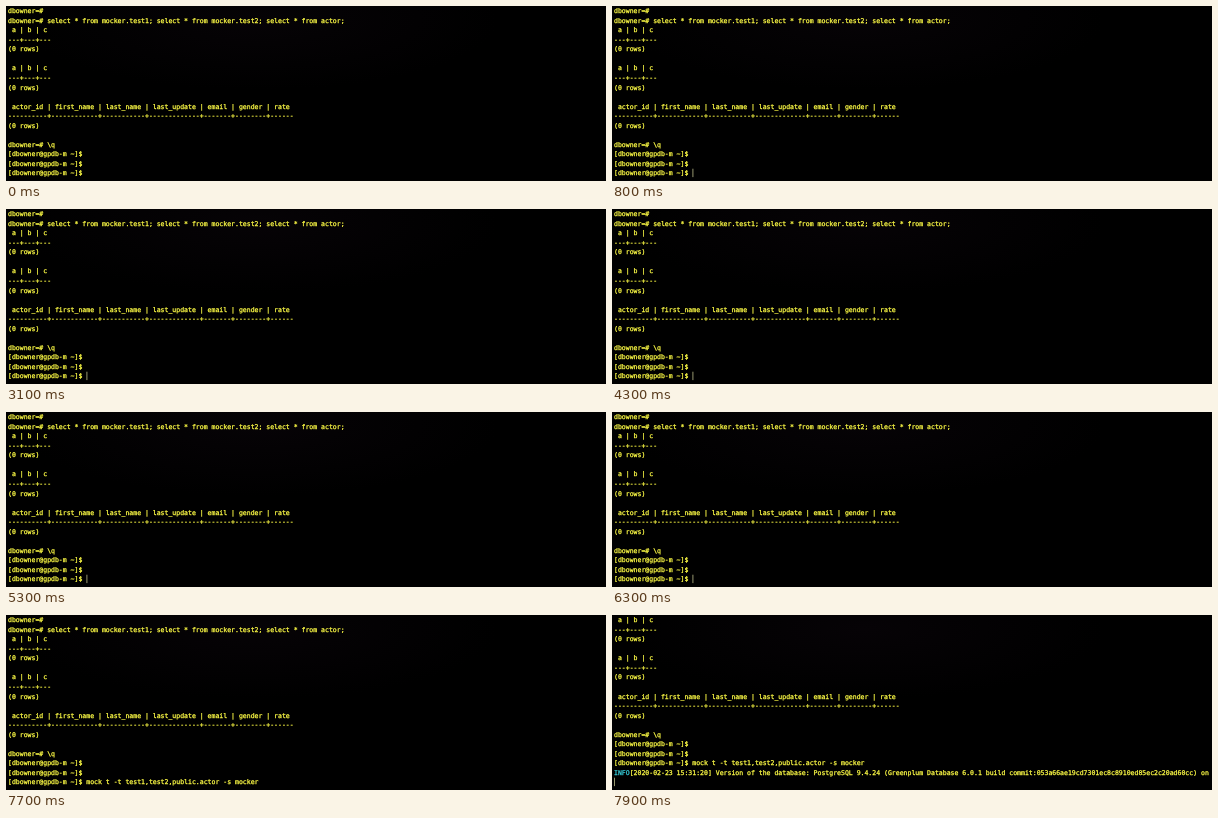
An HTML page for the animation above (8000 ms loop, 600 px wide and 175 px high).

```html
<!DOCTYPE html>
<html lang="en">
<head>
<meta charset="utf-8">
<title>Terminal session</title>
<style>
  html, body { margin: 0; width: 100%; height: 100%; overflow: hidden; background: #000; }
  svg { display: block; width: 100%; height: 100%; }
  text {
    font: 6.51px "DejaVu Sans Mono", monospace;
    fill: #fdfb45;
    stroke: #fdfb45;
    stroke-width: .28;
    white-space: pre;
    text-rendering: geometricPrecision;
  }
  .info { fill: #35cbd8; stroke: #35cbd8; }
</style>
</head>
<body>
<svg viewBox="0 0 600 175" xmlns="http://www.w3.org/2000/svg">
  <defs>
    <radialGradient id="glow" cx=".42" cy=".08" r=".4">
      <stop offset="0" stop-color="#060306"/>
      <stop offset="1" stop-color="#000"/>
    </radialGradient>
  </defs>
  <rect width="600" height="175" fill="url(#glow)"/>
  <g id="screen"></g>
  <rect id="caret" width="1" height="8.4" fill="#96966e"/>
  <path id="pointer" d="M-2 -4Q0 -4 0 -2.8Q0 -4 2 -4M0 -3V3M-2 4Q0 4 0 2.8Q0 4 2 4"
        fill="none" stroke="#c4c4c4" stroke-width=".9"/>
</svg>
<script>
const LOOP = 8000, LEFT = 2, CHAR = 3.92, TOP = 7.3, LINE = 9.53;
const PASTE = 6500, RUN = 7900;
const LAST_ROW = 17;

const $ = id => document.getElementById(id);
const screen = $('screen'), caret = $('caret'), pointer = $('pointer');

const rule = widths => widths.map(n => '-'.repeat(n)).join('+');
const small = [' a | b | c', rule([3, 3, 3]), '(0 rows)', ''];
const shell = '[dbowner@gpdb-m ~]$ ';
const command = 'mock t -t test1,test2,public.actor -s mocker';
const version = '[2020-02-23 15:31:20] Version of the database: PostgreSQL 9.4.24 ' +
  '(Greenplum Database 6.0.1 build commit:053a66ae19cd7301ec8c8910ed85ec2c20ad60cc) on';

const lines = [
  'dbowner=#',
  'dbowner=# select * from mocker.test1; select * from mocker.test2; select * from actor;',
  ...small,
  ...small,
  ' actor_id | first_name | last_name | last_update | email | gender | rate',
  rule([10, 12, 11, 13, 7, 8, 6]),
  '(0 rows)',
  '',
  'dbowner=# \\q',
  shell, shell, shell
];

function addNode(tag, parent, content) {
  const node = document.createElementNS('http://www.w3.org/2000/svg', tag);
  node.textContent = content;
  parent.appendChild(node);
  return node;
}

function addLine(content, row) {
  const node = addNode('text', screen, content);
  node.setAttribute('x', LEFT);
  node.setAttribute('y', TOP + row * LINE);
  return node;
}

const rows = lines.map(addLine);
const prompt = rows[LAST_ROW];
const output = addLine('', LAST_ROW + 1);
addNode('tspan', output, 'INFO').setAttribute('class', 'info');
addNode('tspan', output, version);

const show = (node, on) => node.setAttribute('visibility', on ? 'visible' : 'hidden');
const within = (t, from, to) => t >= from && t < to;

// Spans in which the caret is lit.
const lit = [[100, 1000], [1600, 2500], [3000, 7600], [RUN, LOOP]];

function draw(t) {
  const pasted = t >= PASTE, done = t >= RUN;
  prompt.textContent = shell + (pasted ? command : '');
  show(output, done);
  screen.setAttribute('transform', `translate(0 ${done ? -2 * LINE : 0})`);

  const column = done ? 0 : shell.length + (pasted ? command.length : 0);
  caret.setAttribute('x', LEFT + column * CHAR);
  caret.setAttribute('y', TOP + LAST_ROW * LINE - 6.6);
  show(caret, lit.some(([from, to]) => within(t, from, to)));

  const p = Math.min(1, Math.max(0, (t - 1600) / 300));
  const rest = (1 - p) ** 3;
  pointer.setAttribute('transform', `translate(${153.8 + 177 * rest} ${73.3 + 20 * rest})`);
  show(pointer, within(t, 1600, 2500));
}

const start = performance.now();
function tick() {
  draw((performance.now() - start) % LOOP);
  requestAnimationFrame(tick);
}
tick();
</script>
</body>
</html>
```
